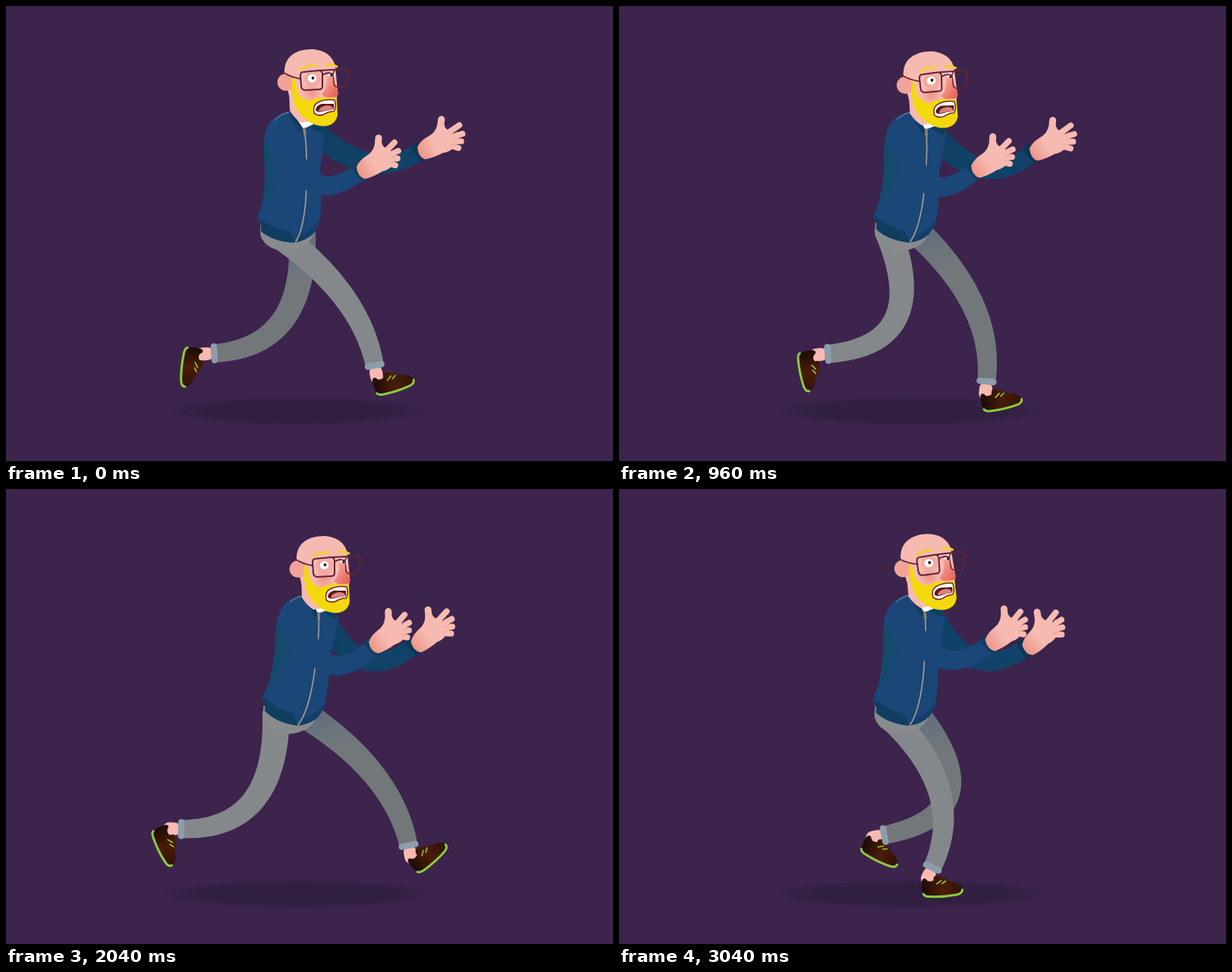
Write an HTML page with a canvas that moves like this. It is 800x600 px and loops after 3080 ms.

```html
<!DOCTYPE html>
<html lang="en">
<head>
<meta charset="utf-8">
<title>Runner</title>
<style>
html, body { margin: 0; width: 100%; height: 100%; overflow: hidden; background: #3c244d; }
canvas { display: block; }
</style>
</head>
<body>
<canvas id="c" width="800" height="600"></canvas>
<script>
const g = document.getElementById('c').getContext('2d');
const LOOP = 3080, STEP = 40, STRIDE = 1346, SWAY = 870, TAU = Math.PI * 2;
const SKIN = '#f6bab1', JACKET = '#1a4678', NAVY = '#103d60', FRAME = '#602139', YELLOW = '#f2d80c';

// Smooth curve through [position, value] pairs, repeating every `period`.
function keyed(keys, period) {
  const n = keys.length;
  const at = i => {
    const k = Math.floor(i / n);
    const [p, v] = keys[i - k * n];
    return [p + k * period, v];
  };
  const slope = i => {
    const [a, b] = [at(i - 1), at(i + 1)];
    return (b[1] - a[1]) / (b[0] - a[0]);
  };
  return x => {
    let i = -1;
    while (at(i + 1)[0] <= x) i++;
    const [p, v] = at(i), [q, w] = at(i + 1), d = q - p, s = (x - p) / d;
    const s2 = s * s, s3 = s2 * s;
    return v * (2 * s3 - 3 * s2 + 1) + w * (3 * s2 - 2 * s3) +
      d * (slope(i) * (s3 - 2 * s2 + s) + slope(i + 1) * (s3 - s2));
  };
}

// Eased values over the whole loop, with a cut at its end.
function eased(keys) {
  return t => {
    let i = 0;
    while (i < keys.length - 2 && keys[i + 1][0] <= t) i++;
    const [p, v] = keys[i], [q, w] = keys[i + 1];
    return v + (w - v) * (1 - Math.cos(Math.PI * (t - p) / (q - p))) / 2;
  };
}

const nearFoot = keyed([[0, -18], [.24, -7], [.4, 32], [.516, 64], [.73, 77], [.88, 30]], 1);
const farFoot = keyed([[.016, -42], [.213, -13], [.253, 3], [.5, 96], [.718, 40], [.7585, 26]], 1);
const headTilt = eased([[0, 0], [360, 0], [960, -1.8], [1640, 0], [2040, 0], [2360, -2.8], [3040, -3.8]]);
const shadowSize = eased([[0, 170], [360, 178], [960, 176], [1640, 170], [2040, 177], [2360, 162], [3040, 178]]);

function fill(d, color) {
  g.fillStyle = color;
  g.fill(new Path2D(d));
}
function line(d, color, width) {
  g.strokeStyle = color;
  g.lineWidth = width;
  g.stroke(new Path2D(d));
}
function oval(x, y, rx, ry, color) {
  g.fillStyle = color;
  g.beginPath();
  g.ellipse(x, y, rx, ry, 0, 0, TAU);
  g.fill();
}
function ramp(x0, y0, x1, y1, ...stops) {
  const r = g.createLinearGradient(x0, y0, x1, y1);
  stops.forEach((c, i) => r.addColorStop(i / (stops.length - 1), c));
  return r;
}
function glow(x, y, r, color) {
  const s = g.createRadialGradient(x, y, 0, x, y, r);
  s.addColorStop(0, color + 'b0');
  s.addColorStop(1, color + '00');
  oval(x, y, r, r, s);
}
function turned(x, y, degrees, draw) {
  g.save();
  g.translate(x, y);
  g.rotate(degrees * Math.PI / 180);
  draw();
  g.restore();
}
function along(p, angle, d) {
  return [p[0] + d * Math.cos(angle), p[1] + d * Math.sin(angle)];
}

// Bendy limb of fixed length, bending a little past its middle; returns the direction at its end.
function limb(a, b, length, side, w0, w1, color) {
  const dx = b[0] - a[0], dy = b[1] - a[1], d = Math.hypot(dx, dy);
  const bow = 2 * side * Math.sqrt(Math.max(0, length * length - d * d) * 3 / 16) / d;
  const k = [a[0] + dx * .6 + dy * bow, a[1] + dy * .6 - dx * bow];
  const left = [], right = [];
  for (let i = 0; i <= 30; i++) {
    const t = i / 30, s = 1 - t, w = w0 + (w1 - w0) * t;
    const p = j => s * s * a[j] + 2 * s * t * k[j] + t * t * b[j];
    const v = j => s * (k[j] - a[j]) + t * (b[j] - k[j]);
    const m = w / Math.hypot(v(0), v(1));
    left.push([p(0) + v(1) * m, p(1) - v(0) * m]);
    right.unshift([p(0) - v(1) * m, p(1) + v(0) * m]);
  }
  g.fillStyle = color;
  g.beginPath();
  left.concat(right).forEach(q => g.lineTo(...q));
  g.fill();
  oval(a[0], a[1], w0, w0, color);
  return Math.atan2(b[1] - k[1], b[0] - k[0]);
}

function cuff(p, angle, half, width, color) {
  const x = -Math.sin(angle) * half, y = Math.cos(angle) * half;
  line(`M${p[0] - x},${p[1] - y}L${p[0] + x},${p[1] + y}`, color, width);
}

function shoe() {
  fill('M-7,2Q-9,16 -6,22Q15,26 38,24Q46,23 45,16Q42,9 30,6Q20,-1 14,-3Q8,-4 8,3Q1,6 -2,0Q-5,-2 -7,2Z',
    ramp(-6, 12, 45, 14, '#1f0c06', '#4a1d08', '#30120a'));
  line('M-6.5,20Q-5,23.5 2,24Q20,26 37,24Q45,23 45,18', '#8ecb3c', 3);
  line('M12,8L18,4M19,8L24,5', '#9ac93c', 1.6);
}

function leg(hip, ankle, angle, color) {
  const a = limb(hip, ankle, 227, 1, 18, 12, color);
  const joint = along(ankle, a, 16);
  line(`M${along(ankle, a, 9)}L${joint}`, SKIN, 17);
  turned(joint[0], joint[1], angle, shoe);
  cuff(ankle, a, 9, 8.5, '#8b9dab');
}

function hand(p, angle, spread) {
  turned(p[0], p[1], angle, () => {
    fill('M-8,-4Q-4,-13 6,-19Q14,-24 16,-34L25,-36Q27,-29 31,-29Q43,-25 42,-9Q36,0 26,2Q13,10 3,12Q-7,9 -8,-4Z',
      ramp(-6, 5, 15, -8, '#ee9486', SKIN));
    line('M20,-26L21,-42', SKIN, 9);
    line(`M31,-25L${42 + spread},-36M34,-19L${47 + spread},-25` +
      `M34,-14L${46 + spread},-15M32,-9L${43 + spread},-6`, SKIN, 7.8);
    line('M37,-23L43,-27M38,-16L43,-18M36,-10L41,-10', '#dd9f98', .8);
  });
}

function arm(a, b, length, w, color, edge) {
  const end = limb(a, b, length, -1, w, 11, color);
  cuff(along(b, end, -4), end, 7, 13, edge);
}

function torso() {
  fill('M374,139Q352,143 344,160Q338,172 340,200Q343,230 337,262L331,281Q338,290 336,297Q352,311 381,312' +
    'Q398,308 406,299Q415,285 415,270Q416,235 414,215Q419,190 419,163L402,156L391,161Z', JACKET);
  fill('M340,178Q350,194 366,215L350,250L338,262Q343,230 340,200Z', ramp(340, 0, 366, 0, '#134a6a', '#1a4775'));
  fill('M332,279Q352,294 374,297L381,312Q352,311 336,297Q338,290 332,279Z', NAVY);
  fill('M384,304Q399,301 413,280Q411,293 406,299Q398,308 382,312Z', '#133f68');
  line('M354,151Q362,142 373,140', '#a9a7ad', .8);
  line('M376,142Q381,155 390,164M402,158Q409,161 415,164', NAVY, 6);
  fill('M378,141L392,162L405,156L400,140Z', '#ffffff');
  line('M393,162Q397,188 396,218Q397,285 382,311', '#a79a8d', 1.7);
  line('M393,162L394,169', '#967f6d', 3.6);
}

function head() {
  fill('M373,104L374,138Q380,148 389,154L412,150L430,110Z', SKIN);
  fill('M368,98Q364,78 374,67Q385,56 405,57Q430,60 434,80L437,112Q437,130 425,135Q395,135 374,122Z', SKIN);
  oval(369, 100.5, 11.3, 11.3, '#f1a398');
  glow(403, 114, 14, '#ef8279');
  fill('M377,95Q383,98 383,108Q385,122 400,125Q413,118 436,122L437,144Q434,158 418,158.5Q400,158 385,139Q375,123 377,95Z', YELLOW);
  oval(404, 96, 11, 10, '#efaba2');
  oval(403.5, 95.5, 5.8, 5.4, '#fff');
  oval(429, 91.5, 4, 4.8, '#fff');
  oval(404.5, 95, 1.9, 2.1, '#2c1620');
  oval(429, 91.5, 1.6, 2, '#2c1620');
  fill('M423,93Q430,90 433,99L438,115Q436,122 430,120Q421,122 416,116Q424,109 423,93Z',
    ramp(416, 98, 437, 114, '#f4aca1', '#e8655a'));
  line('M389,84Q398,77 409,79M422,78Q430,76 436,80', '#f2d02c', 3);

  const mouth = 'M406,141Q404,131 411,127Q421,122 433,124Q436,133 432,139Q425,139 419,143Q411,146 406,141Z';
  fill(mouth, '#fff');
  fill('M408,137Q409,131 416,129L432,129Q433,134 431,137Q423,137 417,139Q410,141 408,137Z', '#5b1717');
  fill('M412,139Q413,132 423,131Q432,131 431,137Q422,137 412,139Z', '#dc817a');
  line(mouth, '#712323', 1.5);

  line('M392,87L412,85Q417,85 417,90L417,106Q417,110 412,110L395,111Q389,111 389,105L388,92Q388,87 392,87Z', FRAME, 2);
  line('M434,84L447,83Q451,83 451,88L450,102Q449,107 444,107L437,107Q432,106 432,101L431,88Z', '#6c242f', 1.5);
  line('M414,85L433,84M417,91Q424,86 431,90M366,88Q376,94 388,96', FRAME, 1.8);
  line('M450,88L454,87', '#6c242f', 1.3);
}

function shadow(t) {
  g.save();
  g.translate(384, 534);
  g.scale(shadowSize(t), 19);
  const s = g.createRadialGradient(0, 0, 0, 0, 0, 1);
  [[0, 'ff'], [.7, 'e8'], [.88, '90'], [1, '00']].forEach(([p, a]) => s.addColorStop(p, '#301f40' + a));
  oval(0, 0, 1, 1, s);
  g.restore();
}

function draw(t) {
  const near = t / STRIDE % 1, far = (near + .5) % 1;
  const lean = (1 - Math.cos(TAU * near)) / 2;
  const sway = (1 - Math.cos(TAU * t / SWAY)) / 2;
  const wave = (f, mean, c, s, c2) =>
    mean + c * Math.cos(TAU * f) + s * Math.sin(TAU * f) + c2 * Math.cos(2 * TAU * f);
  const nearAnkle = [361 + 138 * Math.cos(TAU * (near - .07)), wave(near, 471.5, 12, 19, -9.5)];
  const farAnkle = [400 + 138 * Math.cos(TAU * (far - .068)), wave(far, 469.3, 5, 19.5, -6.3)];
  const nearHand = [470 + 21 * sway, 216 - 14 * sway];
  const farHand = [548 - 10 * sway, 190 + 18 * sway];

  g.fillStyle = '#3c244d';
  g.fillRect(0, 0, 800, 600);
  shadow(t);

  arm([407 + 11 * lean, 166 + 2 * lean], farHand, 157, 15, ramp(420, 170, 540, 200, '#0f4064', '#11436a'), '#0d3654');
  hand([farHand[0] + 2, farHand[1]], 4 - 17 * sway, 3);

  leg([390 + 3 * lean, 297], farAnkle, farFoot(far),
    ramp(398, 300, 422, 350, '#656a7c', '#6b747c', '#72777a'));
  leg([353 + 3 * lean, 297], nearAnkle, nearFoot(near), '#84888b');
  const o = 4 * lean;
  fill(`M${335 + o},286L${336 + o},304Q${343 + o},322 ${370 + o},323Q${399 + o},320 ${407 + o},298L${400 + o},286Z`, '#888b8d');

  turned(381 + 3 * lean, 312, 6.2 * lean, () => {
    g.translate(-381, -312);
    torso();
  });
  arm([368 + 15 * lean, 172 + lean], nearHand, 146, 16, JACKET, NAVY);
  hand(nearHand, -6 * sway, 0);

  turned(395 + 16 * lean, 150 + 5 * lean, headTilt(t), () => {
    g.translate(-395, -150);
    head();
  });
}

g.lineCap = g.lineJoin = 'round';
const start = performance.now();
function tick() {
  const t = (performance.now() - start) % LOOP;
  draw(Math.floor(t / STEP) * STEP);
  requestAnimationFrame(tick);
}
tick();
</script>
</body>
</html>
```
